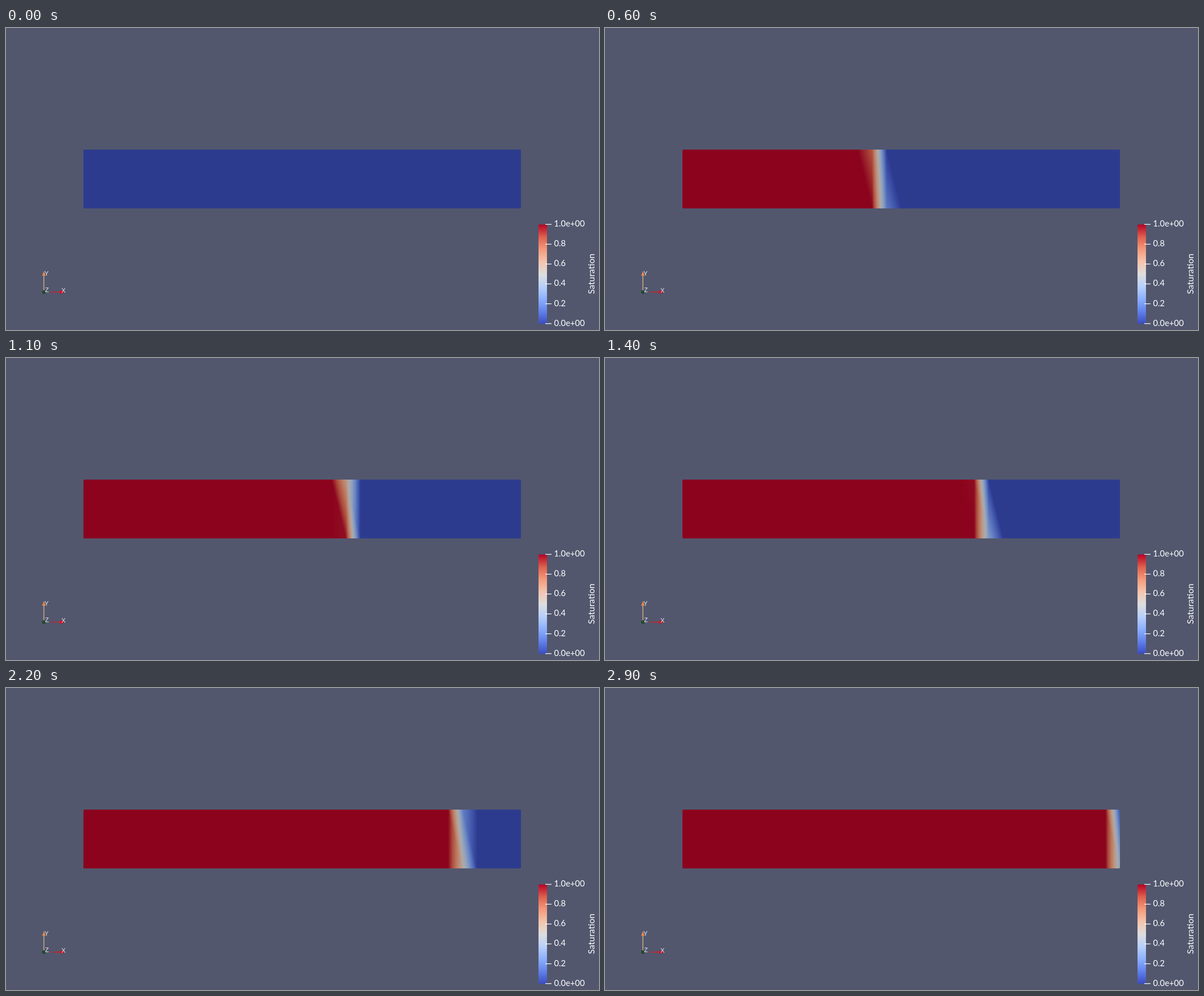
These frames come from a looping animation (1049 px wide and 534 px high, 3 s). An HTML page with a canvas:

```html
<!DOCTYPE html>
<html lang="en">
<head>
<meta charset="utf-8">
<title>Saturation front</title>
<style>
  html, body { margin: 0; width: 100%; height: 100%; overflow: hidden; background: #52576e; }
  svg, canvas { position: absolute; left: 0; top: 0; }
  canvas { left: 137px; top: 215px; border-radius: 2px; }
  text { fill: #fff; font: 14.8px Lato, sans-serif; }
  .axis text { fill: #e8e8ec; font: 11px "Liberation Sans", Arial, sans-serif; }
</style>
</head>
<body>
<canvas id="bar" width="774" height="104"></canvas>
<svg width="1049" height="534">
  <defs><linearGradient id="map" x1="0" y1="1" x2="0" y2="0"></linearGradient></defs>
  <g class="axis">
    <path d="M67 466V437" stroke="#d3b27c" stroke-width="1.4"/>
    <path d="M67 429.5L70 438H64Z" fill="#e58a4c"/>
    <path d="M79 467H98" stroke="#d0202a" stroke-width="1.4"/>
    <path d="M104 467L96 463.8V470.2Z" fill="#d40f1c"/>
    <circle cx="67" cy="467" r="3.2" fill="#22482f"/>
    <text x="68" y="438">Y</text>
    <text x="69" y="467">Z</text>
    <text x="98" y="468">X</text>
  </g>
  <rect x="942" y="347.5" width="15" height="175.5" fill="url(#map)"/>
  <g id="ticks"></g>
  <text transform="translate(1041 470.5) rotate(-90)" style="font-size:15.8px">Saturation</text>
</svg>
<script>
const CELLS = 30, STEP = 100, SHADE = 0.77;
const stops = [[59, 76, 192], [98, 130, 234], [141, 176, 254], [184, 208, 249], [221, 221, 221],
               [245, 196, 173], [244, 154, 123], [222, 96, 77], [180, 4, 38]];
const $ = id => document.getElementById(id);
const clamp = v => Math.max(0, Math.min(1, v));

function colour(s) {
  const p = s * (stops.length - 1), i = Math.min(stops.length - 2, Math.floor(p));
  return stops[i].map((c, k) => c + (stops[i + 1][k] - c) * (p - i));
}

$("map").innerHTML = stops.map((c, i) =>
  `<stop offset="${i / (stops.length - 1)}" stop-color="rgb(${c})"/>`).join("");
$("ticks").innerHTML = ["0.0e+00", "0.2", "0.4", "0.6", "0.8", "1.0e+00"].map((label, i) => {
  const y = 522.7 - 35.1 * i;
  return `<path d="M954 ${y}H965" stroke="#fff" stroke-width="1.2"/><text x="969.5" y="${y + 3.9}">${label}</text>`;
}).join("");

const canvas = $("bar"), ctx = canvas.getContext("2d");
const { width, height } = canvas;
const image = ctx.createImageData(width, height);
const table = Array.from({ length: 256 }, (_, i) => colour(i / 255).map(c => c * SHADE));
table[0][2] = 143;

// The front advances with the square root of time; the lower nodes fill first.
function draw(step) {
  const filled = 5.52 * Math.sqrt(step) - 0.5;
  const node = (i, lead) => step === 0 ? 0 : i === 0 ? 1 : clamp(filled + lead - i + 1);
  const top = [], low = [];
  for (let i = 0; i <= CELLS; i++) {
    top.push(node(i - 0, -0.17 - 0));
    low.push(node(i, 0.17));
  }
  for (let x = 0; x < width; x++) {
    const p = (x + 0.5) / width * CELLS, i = Math.floor(p), u = p - i;
    const a = top[i], b = top[i + 1], c = low[i], d = low[i + 1];
    for (let y = 0; y < height; y++) {
      const v = (y + 0.5) / height;
      const s = u > v ? a + u * (b - a) + v * (d - b) : a + v * (c - a) + u * (d - c);
      const rgb = table[Math.round(clamp(s) * 255)];
      image.data.set([rgb[0], rgb[1], rgb[2], 255], (y * width + x) * 4);
    }
  }
  ctx.putImageData(image, 0, 0);
}

let shown = -1;
function frame() {
  const step = Math.floor(performance.now() / STEP) % 30;
  if (step !== shown) draw(shown = step);
  requestAnimationFrame(frame);
}
frame();
</script>
</body>
</html>
```
